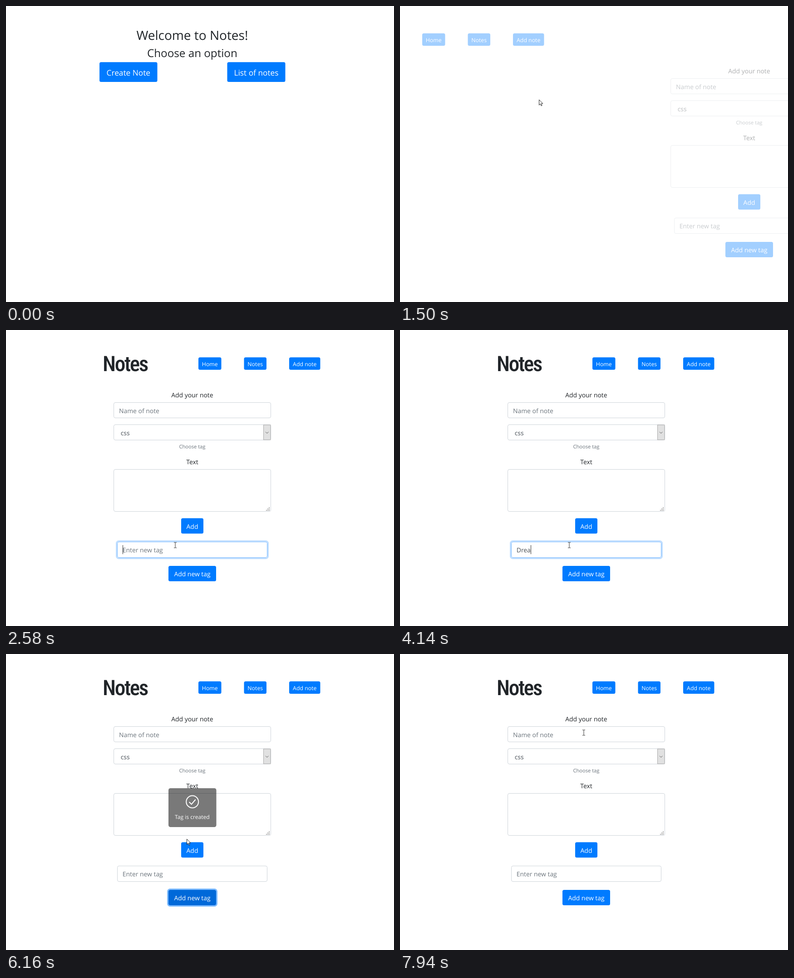
Write an HTML page that moves like this. It is 855x655 px and loops after 8000 ms.

```html
<!DOCTYPE html>
<html lang="en">
<head>
<meta charset="utf-8">
<title>Notes</title>
<style>
  html, body { margin: 0; width: 100%; height: 100%; overflow: hidden; background: #fff; }
  svg { display: block; width: 855px; height: 655px; }
  text { font: 13.9px "Open Sans", "Noto Sans", sans-serif; fill: #212529; white-space: pre; text-rendering: geometricPrecision; }
  .mid { text-anchor: middle; }
  .title { font: 500 47px "Roboto Condensed", "Open Sans Condensed", Roboto, sans-serif; font-stretch: 75%; letter-spacing: -2.3px; }
  .field { fill: #fff; stroke: #ced4da; }
</style>
</head>
<body>
<svg id="stage" viewBox="0 0 855 655">
  <g id="welcome"></g>
  <g id="header"></g>
  <g id="form"></g>
  <g id="toast">
    <rect x="358" y="297" width="105.5" height="86" rx="4.5" fill="#000" fill-opacity=".7"/>
    <g fill="none" stroke="#fff" stroke-width="2">
      <circle cx="410.7" cy="327" r="13.5"/>
      <path d="M403.7 327.5l5 5 9-10.5"/>
    </g>
  </g>
  <path id="arrow" d="M.5.5V12.3L3.3 9.7L5.2 14L7 13.2L5.1 9H8.9Z" fill="#fff" stroke="#111" stroke-width=".9"/>
  <path id="beam" d="M-3-6H-.8L0-5.4L.8-6H3M0-5.4V5.4M-3 6H-.8L0 5.4L.8 6H3" fill="none" stroke="#333"/>
</svg>
<script>
const LOOP = 8000;
const CENTER = 410.4;
const BLUE = [0, 123, 255], DARK = [0, 105, 217];
const $ = id => document.getElementById(id);

function add(parent, tag, attrs, content = "") {
  const node = document.createElementNS("http://www.w3.org/2000/svg", tag);
  for (const key in attrs) node.setAttribute(key, attrs[key]);
  node.textContent = content;
  parent.append(node);
  return node;
}

function label(parent, content, x, y, { size = 13.9, color = "#212529", mid = true } = {}) {
  return add(parent, "text", { x, y, class: mid ? "mid" : "", style: `font-size:${size}px;fill:${color}` }, content);
}

function button(parent, content, x, y, w, h, baseline, size) {
  const box = add(parent, "rect", { x, y, width: w, height: h, rx: 3.5, fill: "#007bff" });
  label(parent, content, x + w / 2, baseline, { size, color: "#fff" });
  return box;
}

function field(x, y, w, h) {
  return add($("form"), "rect", { x, y, width: w, height: h, rx: 3.5, class: "field" });
}

function ring(x, y, w, h) {
  return add($("form"), "rect", { x, y, width: w, height: h, rx: 5, fill: "none", stroke: "#007bff", "stroke-width": 3, opacity: 0 });
}

// Welcome page
const welcome = $("welcome");
label(welcome, "Welcome to Notes!", CENTER, 74.5, { size: 28 });
label(welcome, "Choose an option", CENTER, 112.5, { size: 24.2 });
const createButton = button(welcome, "Create Note", 206, 124.3, 127.5, 43.7, 153.5, 17.3);
button(welcome, "List of notes", 487.5, 124.3, 128, 43.7, 153.5, 17.3);

// Header
const header = $("header");
add(header, "text", { x: 262.5, y: 91, class: "title mid" }, "Notes");
button(header, "Home", 424, 60.5, 50.5, 27.5, 80, 12.3);
button(header, "Notes", 524.5, 60.5, 49.5, 27.5, 80, 12.3);
button(header, "Add note", 624, 60.5, 68.5, 27.5, 80, 12.3);

// Form
const form = $("form");
const left = color => ({ color, mid: false });
label(form, "Add your note", CENTER, 148.5);
field(237.5, 160.5, 346, 34);
label(form, "Name of note", 249, 183.5, left("#6c757d"));
field(237.5, 209.5, 346, 34);
label(form, "css", 252.7, 233, left("#495057"));
add(form, "rect", { x: 567.5, y: 210, width: 15.5, height: 33, fill: "#e1e1e1", stroke: "#adadad" });
add(form, "path", { d: "M572 225.5l3.2 3.2 3.2-3.2", fill: "none", stroke: "#555" });
label(form, "Choose tag", CENTER, 261.5, { size: 11.15, color: "#6c757d" });
label(form, "Text", CENTER, 297);
field(237.5, 308.5, 346, 93);
for (let row = 0; row < 3; row++)
  for (let col = 2 - row; col < 3; col++)
    add(form, "rect", { x: 573 + col * 3, y: 392 + row * 3, width: 2, height: 2, fill: "#aaa" });
button(form, "Add", 386, 416.5, 49, 34, 439.5);
const tagField = field(245.5, 469, 330, 34.5);
const fieldRing = ring(243.5, 467, 334, 38.5);
const placeholder = label(form, "Enter new tag", 256.8, 492, left("#6c757d"));
const typed = label(form, "", 256.8, 492, left("#495057"));
const caret = add(form, "rect", { y: 476, width: 1, height: 20, fill: "#333" });
const tagButton = button(form, "Add new tag", 358, 522, 105, 34, 545);
const buttonRing = ring(356.5, 520.5, 108, 37);
label($("toast"), "Tag is created", CENTER, 364.5, { size: 12.1, color: "#fff" });

const clamp = v => Math.max(0, Math.min(1, v));
const ramp = (t, from, to) => clamp((t - from) / (to - from));
const smooth = p => p * p * (3 - 2 * p);
const within = (t, from, to) => t >= from && t < to;
const mix = (a, b, p) => `rgb(${a.map((v, i) => Math.round(v + (b[i] - v) * p))})`;

// Progress in n equal holds; the first starts at `from`, the last at `to`.
// The small slack absorbs uneven hold lengths.
function stepped(t, from, to, n) {
  if (t < from) return 0;
  return Math.min(n, Math.floor((t - from) / (to - from) * (n - 1) + 1.1)) / n;
}

// [start, end, steps, x, y]
const moves = [
  [200, 970, 11, 303, 163],
  [1350, 1500, 3, 306, 207],
  [1820, 2200, 6, 373, 476],
  [5070, 5540, 7, 391.5, 540],
  [5930, 6620, 10, 410, 168],
  [7246, 7550, 5, 405, 174]
];

function cursorAt(t) {
  let x = 657, y = 543;
  for (const [from, to, n, endX, endY] of moves) {
    const p = smooth(stepped(t, from, to, n));
    x += (endX - x) * p;
    y += (endY - y) * p;
  }
  return { x, y };
}

const inputRows = [[160, 195], [309, 402], [469, 504]];
const keyTimes = [3680, 3910, 4060, 4140, 4370, 4520];

function show(node, visible) {
  node.setAttribute("display", visible ? "inline" : "none");
}

function render(t) {
  show(welcome, t < 1040);
  createButton.setAttribute("fill", mix(BLUE, DARK, ramp(t, 820, 970)));

  const entered = stepped(t, 1350, 1660, 5) ** 2;
  for (const [node, offset] of [[header, -586], [form, 561]]) {
    show(node, entered > 0);
    node.setAttribute("opacity", entered);
    node.setAttribute("transform", `translate(${offset * (1 - entered)} 0)`);
  }

  const focus = stepped(t, 2350, 2580, 4) - stepped(t, 5540, 5700, 3);
  fieldRing.setAttribute("opacity", focus * .25);
  tagField.style.stroke = mix([206, 212, 218], [128, 189, 255], focus);

  const text = t < 5780 ? "Dreams".slice(0, keyTimes.filter(k => t >= k).length) : "";
  typed.textContent = text;
  show(placeholder, !text);
  caret.setAttribute("x", Math.round(256.8 + (text ? typed.getComputedTextLength() : 0)));
  show(caret, within(t, 2350, 2960) || within(t, 3510, 5140));

  const released = stepped(t, 7250, 7400, 3);
  buttonRing.setAttribute("opacity", (stepped(t, 5540, 5700, 3) - released) * .5);
  tagButton.setAttribute("fill", mix(BLUE, DARK, stepped(t, 5380, 5540, 3) - released));

  const toast = stepped(t, 6000, 6230, 4) - stepped(t, 7700, 7940, 4);
  $("toast").setAttribute("opacity", toast);

  const { x, y } = cursorAt(t);
  const overInput = t > 1660 && toast <= 0 && x > 237 && x < 584 &&
    inputRows.some(([top, bottom]) => within(y, top, bottom));
  show($("arrow"), t >= 200 && !overInput);
  show($("beam"), overInput);
  for (const id of ["arrow", "beam"])
    $(id).setAttribute("transform", `translate(${x} ${y})`);
}

const start = performance.now();
function tick() {
  render((performance.now() - start) % LOOP);
  requestAnimationFrame(tick);
}
tick();
</script>
</body>
</html>
```
